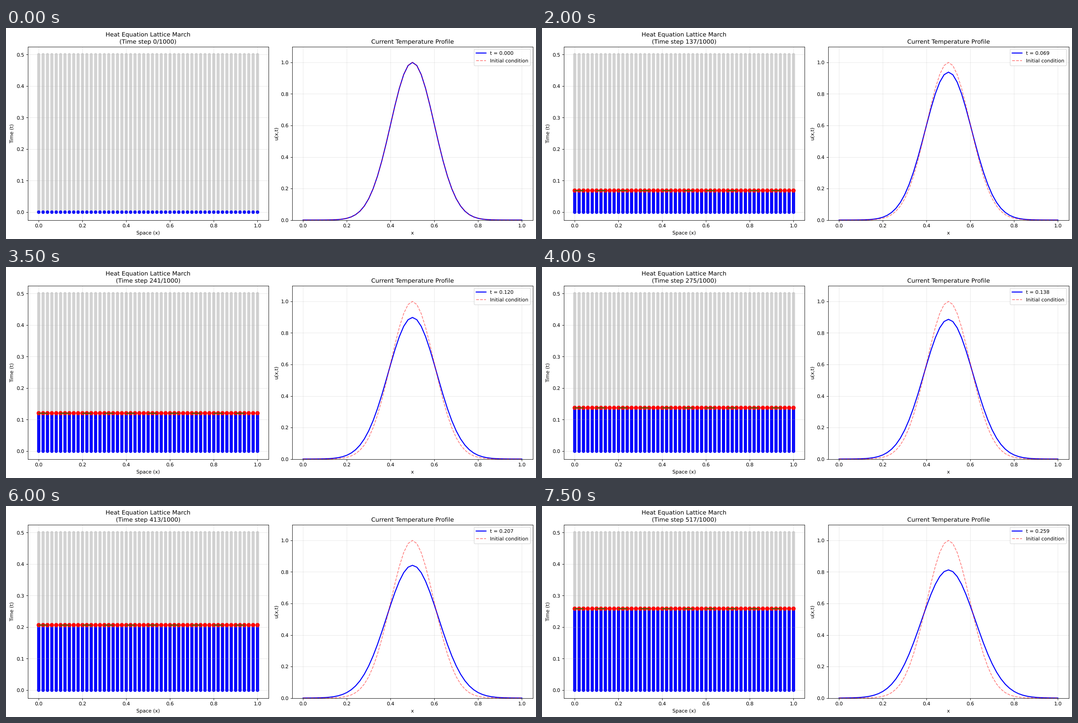
Write a matplotlib script that moves like this. It is 1187 px wide and 472 px high and loops after 8 s.

```python
import numpy as np
import matplotlib.pyplot as plt
from matplotlib.animation import FuncAnimation

W, H, DPI = 1187, 472, 80
FRAMES, INTERVAL = 16, 500
NX, NT = 51, 1000
ALPHA = 0.01
BAR, DOT, FRONT = 6.2, 7.0, 8.6   # widths in points

plt.rcParams["text.hinting"] = "none"

x = np.linspace(0, 1, NX)
t = np.linspace(0, 0.5, NT + 1)
r = ALPHA * (t[1] - t[0]) / (x[1] - x[0]) ** 2


def solve():
    """Explicit finite differences with fixed ends."""
    u = np.empty((NT + 1, NX))
    u[0] = np.exp(-50 * (x - 0.5) ** 2)
    for n in range(NT):
        u[n + 1] = u[n]
        u[n + 1, 1:-1] += r * (u[n, 2:] - 2 * u[n, 1:-1] + u[n, :-2])
    return u


def segments(t0, t1):
    """One vertical segment per lattice column; a tiny one makes a dot."""
    return [[(a, t0), (a, t1 + 1e-5)] for a in x]


def columns(t0, t1, color, width):
    lines = ax1.vlines(x, t0, t1, color=color, lw=width, capstyle="round",
                       snap=False, zorder=1)
    lines.set_segments(segments(t0, t1))
    return lines


def stencils(n):
    """Short links from the previous row to every fifth new point."""
    i = np.arange(1, NX - 1, 5)
    gap = np.full(len(i), np.nan)
    xs = np.column_stack([x[i - 1], x[i], x[i + 1], gap])
    ts = np.tile([t[n - 1], t[n], t[n - 1], np.nan], (len(i), 1))
    return xs.ravel(), ts.ravel()


def add_axes(left, xlabel, ylabel, ylim):
    top, bottom, width = 41.7, 429.6, 539
    ax = fig.add_axes([left / W, 1 - bottom / H, width / W, (bottom - top) / H])
    ax.set(xlim=(-0.05, 1.05), ylim=ylim)
    ax.set_xlabel(xlabel, labelpad=4.7)
    ax.set_ylabel(ylabel)
    ax.grid(True, alpha=0.3)
    return ax


u = solve()
fig = plt.figure(figsize=(W / DPI, H / DPI), dpi=DPI)

ax1 = add_axes(48.8, "Space (x)", "Time (t)", (-0.025, 0.525))
columns(0, t[-1], "lightgray", BAR)
done = columns(0, 0, "blue", BAR)
columns(0, 0, "blue", DOT)
front = columns(0, 0, "red", FRONT)
links, = ax1.plot([], [], "g-", lw=2, alpha=0.7)
title = ax1.set_title("", linespacing=1.28)

ax2 = add_axes(640.8, "x", "u(x,t)", (0, 1.1))
ax2.set_title("Current Temperature Profile")
curve, = ax2.plot(x, u[0], "b-", lw=2, label="t = 0.000")
ax2.plot(x, u[0], "r--", alpha=0.5, label="Initial condition")
legend = ax2.legend(loc="upper right", labelspacing=0.54, borderpad=0.42)
label = legend.get_texts()[0]


def update(frame):
    n = int(frame * NT / 29)
    for artist in (done, front, links):
        artist.set_visible(n > 0)
    if n:
        done.set_segments(segments(0, t[n - 1]))
        front.set_segments(segments(t[n], t[n]))
        links.set_data(*stencils(n))
    title.set_text(f"Heat Equation Lattice March\n(Time step {n}/{NT})")
    curve.set_ydata(u[n])
    label.set_text(f"t = {t[n]:.3f}")
    return done, front, links, title, curve, label


anim = FuncAnimation(fig, update, frames=FRAMES, interval=INTERVAL,
                     repeat=True, repeat_delay=0, blit=False)
plt.show()
```
